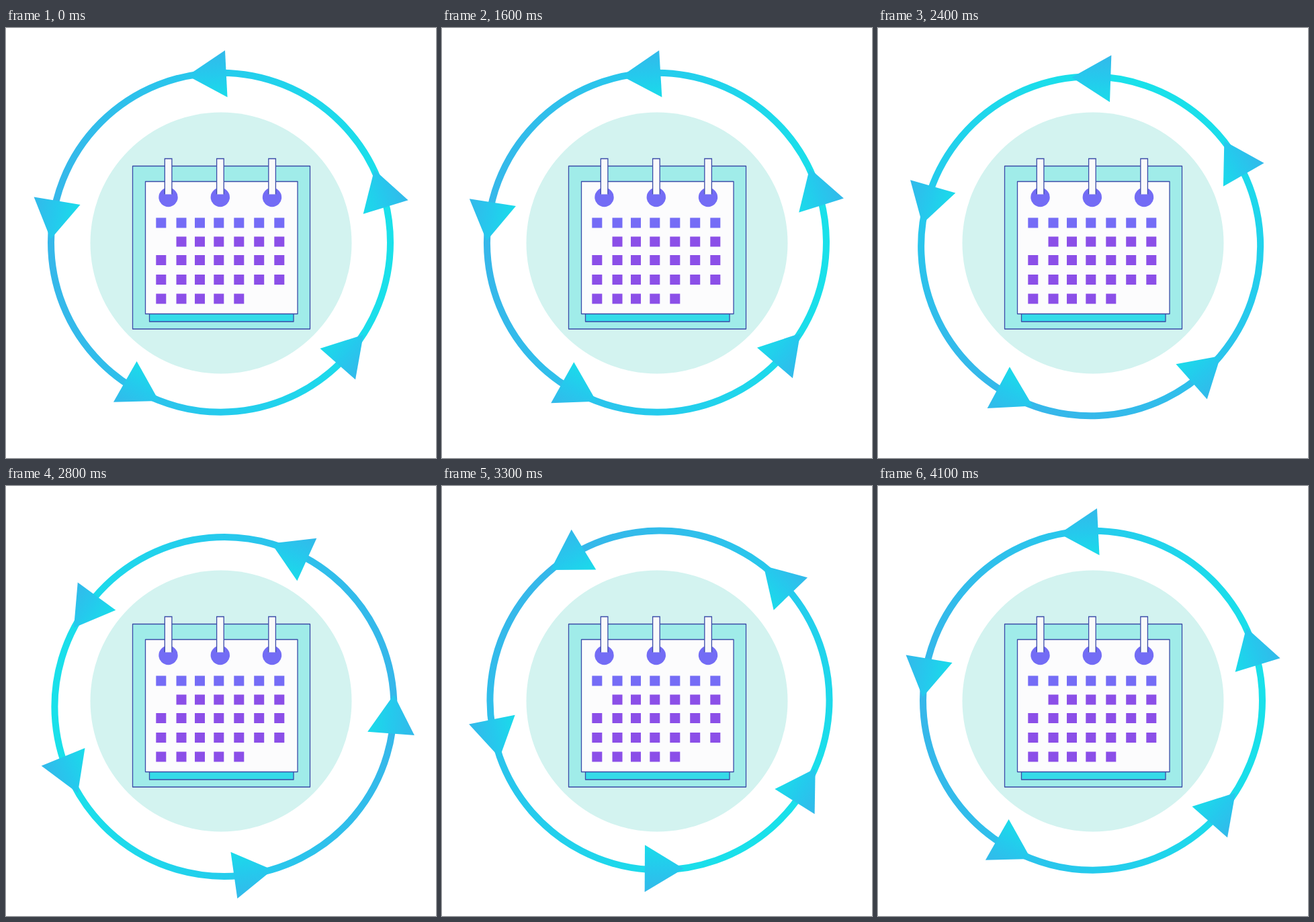
Recreate the animation shown at these times as an HTML page. Size 640 by 640 pixels, loop 6.1 s.

```html
<!DOCTYPE html>
<html lang="en">
<head>
<meta charset="utf-8">
<title>Calendar cycle</title>
<style>
html, body { margin: 0; height: 100%; overflow: hidden; background: #fff; }
svg { display: block; width: 100%; height: 100%; }
</style>
</head>
<body>
<svg viewBox="0 0 640 640">
  <defs>
    <linearGradient id="ringFill" gradientUnits="userSpaceOnUse" x1="62" y1="0" x2="577" y2="0">
      <stop offset="0" stop-color="#36b7ea"/>
      <stop offset=".5" stop-color="#25cbed"/>
      <stop offset="1" stop-color="#19e1ea"/>
    </linearGradient>
    <linearGradient id="arrowFill" gradientUnits="userSpaceOnUse" x1="279" y1="62" x2="210" y2="52">
      <stop offset="0" stop-color="#33b9ea"/>
      <stop offset=".5" stop-color="#25c9ed"/>
      <stop offset="1" stop-color="#1adcea"/>
    </linearGradient>
  </defs>
  <circle cx="320" cy="320" r="194.5" fill="#d3f3f0"/>
  <g stroke="#3b4ba8" stroke-width="1.3" stroke-linejoin="round">
    <path d="M188.5 205.5H452.5V448H188.5Z" fill="#a0ece9"/>
    <path d="M213.5 425H428V437H213.5Z" fill="#35dbe8"/>
    <path d="M207.5 228.5H434V425.5H207.5Z" fill="#fcfcfd"/>
  </g>
  <g id="binding"></g>
  <g id="days"></g>
  <g id="ring">
    <circle cx="319.5" cy="319.2" r="252.5" fill="none" stroke="url(#ringFill)" stroke-width="10"/>
  </g>
</svg>
<script>
const LOOP = 6100, START = 1500, DURATION = 2600, STEP = 100;
const byId = id => document.getElementById(id);
const add = (id, markup) => byId(id).insertAdjacentHTML('beforeend', markup);

for (const x of [241.5, 318.8, 396]) {
  add('binding', `<circle cx="${x}" cy="252" r="14.2" fill="#736cf5"/>
    <path d="M${x - 5.2} 247.5V194.5h10.6V247.5" fill="#fafafb" stroke="#3b4ba8" stroke-width="1.3"/>`);
}

const columns = [223.3, 253.5, 281, 309.3, 339.3, 369.2, 399.3];
const rows = [282.5, 310.5, 338, 367, 395.5];
rows.forEach((y, row) => columns.forEach((x, col) => {
  if ((row === 1 && col === 0) || (row === 4 && col > 4)) return;
  add('days', `<rect x="${x}" y="${y}" width="15" height="15" fill="${row ? '#8b4fe8' : '#756cf6'}"/>`);
}));

for (const angle of [25.3, 101.3, 178.9, 248.7, 327.1]) {
  add('ring', `<path d="M253 0L210 52.2L279.2 62.4Z" fill="url(#arrowFill)"
    transform="translate(319.5 319.2) rotate(${-angle})"/>`);
}

// Cubic bezier easing (.576, 0, .408, 1), solved by bisection
function ease(x) {
  let low = 0, high = 1;
  for (let i = 0; i < 30; i++) {
    const s = (low + high) / 2, r = 1 - s;
    if (3 * .576 * s * r * r + 3 * .408 * s * s * r + s ** 3 < x) low = s;
    else high = s;
  }
  return low * low * (3 - 2 * low);
}

function draw(now) {
  const time = Math.floor(now % LOOP / STEP) * STEP;
  const progress = Math.min(1, Math.max(0, (time - START) / DURATION));
  byId('ring').setAttribute('transform', `rotate(${-360 * ease(progress)} 322 324)`);
  requestAnimationFrame(draw);
}
draw(0);
</script>
</body>
</html>
```
